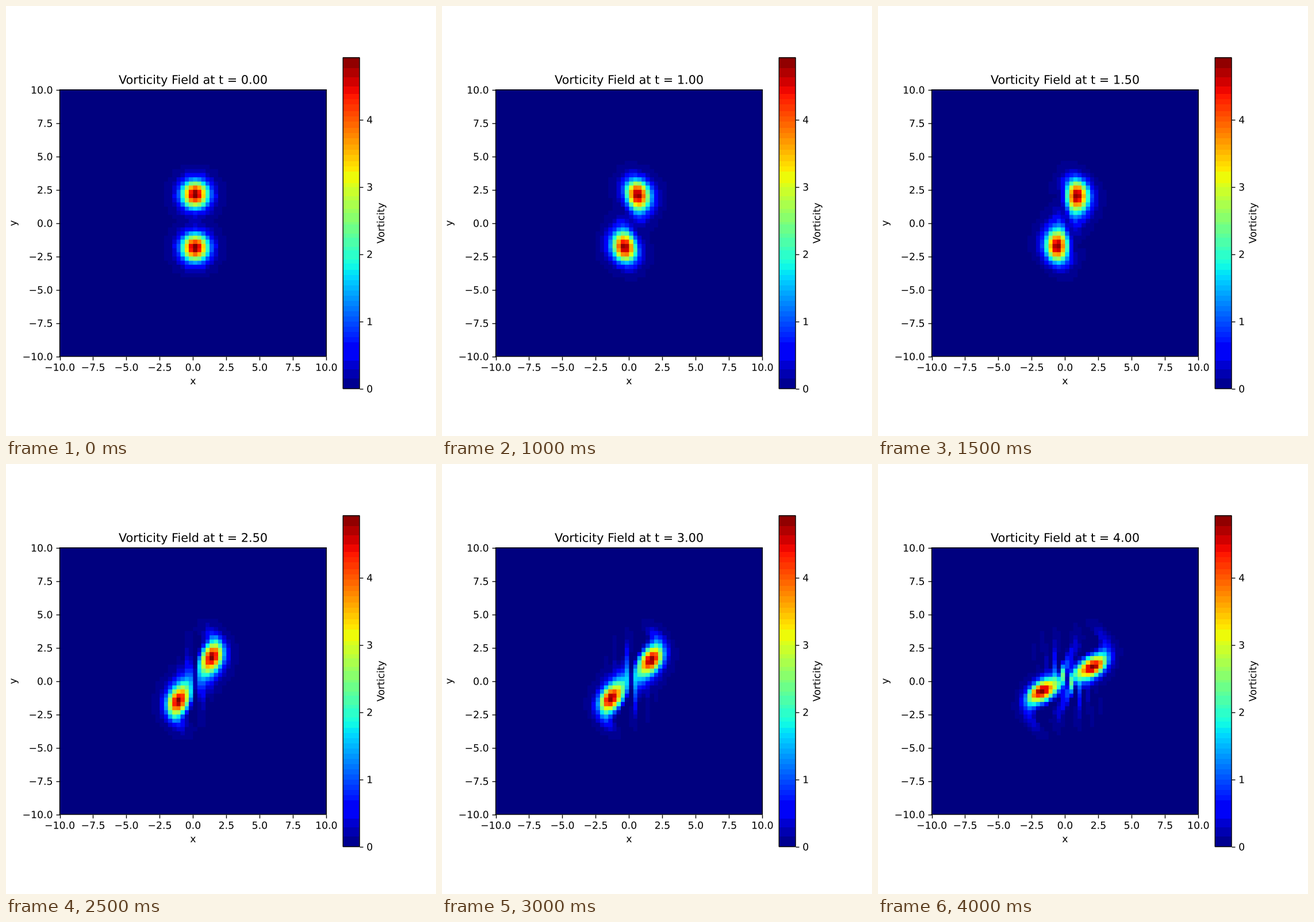
A matplotlib script that plays this animation: 748x748 px, repeating every 4.5 s.

```python
import numpy as np
import matplotlib.pyplot as plt
from matplotlib.animation import FuncAnimation
from matplotlib.cm import ScalarMappable
from matplotlib.colors import ListedColormap, Normalize
from matplotlib.patheffects import Normal

STAGE = 748
FINE = 1200      # layout grid on which the cell edges are whole numbers
N = 64
L = 20.0
H = L / N
NU = 0.001
DT = 0.0125
SAVE_EVERY = 0.5
FRAMES = 9

# Smooth sub-pixel placement of lines and text
plt.rcParams["path.snap"] = False
plt.rcParams["path.effects"] = [Normal()]
plt.rcParams["text.hinting"] = "none"

axis = np.linspace(-L / 2, L / 2, N, endpoint=False)
X, Y = np.meshgrid(axis, axis)
k = 2 * np.pi * np.fft.fftfreq(N, d=H)
K2 = k[None, :] ** 2 + k[:, None] ** 2
K2[0, 0] = 1.0


def stream(w):
    """Periodic solution of laplacian(psi) = w with zero mean."""
    wt = np.fft.fft2(w)
    wt[0, 0] = 0
    return np.real(np.fft.ifft2(-wt / K2))


def diff(f, ax):
    return (np.roll(f, -1, ax) - np.roll(f, 1, ax)) / (2 * H)


def laplacian(f):
    total = sum(np.roll(f, s, ax) for s in (-1, 1) for ax in (0, 1))
    return (total - 4 * f) / H**2


def rhs(w):
    psi = stream(w)
    advect = diff(psi, 1) * diff(w, 0) - diff(psi, 0) * diff(w, 1)
    return NU * laplacian(w) + advect


def rk4(w):
    a = rhs(w)
    b = rhs(w + DT / 2 * a)
    c = rhs(w + DT / 2 * b)
    d = rhs(w + DT * c)
    return w + DT / 6 * (a + 2 * b + 2 * c + d)


def simulate():
    w = sum(5 * np.exp(-X**2 - (Y - y0) ** 2) for y0 in (-2, 2))
    fields = [w]
    for _ in range(FRAMES - 1):
        for _ in range(round(SAVE_EVERY / DT)):
            w = rk4(w)
        fields.append(w)
    return fields


def banded_jet():
    """Jet in flat bands: 8 levels of red and blue, 16 of green."""
    lut = plt.get_cmap("jet")(np.arange(256), bytes=True)[:, :3].astype(int)
    keys = lut // np.array([32, 16, 32])
    out = np.empty((256, 3))
    for key in np.unique(keys, axis=0):
        same = (keys == key).all(axis=1)
        out[same] = lut[same].mean(axis=0) / 255
    return ListedColormap(out)


def coverage(start, size):
    """First pixel of the plot box and the share of each cell in each pixel."""
    edges = (start + np.round(np.arange(N + 1) * size / N)) * STAGE / FINE
    first = int(np.floor(edges[0]))
    p = np.arange(first, np.ceil(edges[-1]))[:, None]
    share = np.minimum(p + 1, edges[1:]) - np.maximum(p, edges[:-1])
    share = np.clip(share, 0, None)
    return first, share / share.sum(axis=1, keepdims=True)


fields = simulate()
scale = ScalarMappable(Normalize(0, fields[0].max()), banded_jet())
left, wx = coverage(150, 744)
bottom, wy = coverage(222, 744)


def paint(w):
    cells = scale.to_rgba(w)[..., :3]
    rgb = np.einsum("ij,jkc,lk->ilc", wy, cells, wx, optimize=True)
    return np.uint8(np.clip(np.round(rgb * 255), 0, 255))


fig, ax = plt.subplots(figsize=(6, 6), dpi=STAGE / 6)
im = fig.figimage(paint(fields[0]), xo=left, yo=bottom, origin="lower",
                  zorder=-1)
ax.patch.set_visible(False)
ax.set(xlim=(-10, 10), ylim=(-10, 10), aspect="equal", xlabel="x", ylabel="y")
fig.colorbar(scale, ax=ax, label="Vorticity")
title = ax.set_title("Vorticity Field at t = 0.00")


def update(i):
    im.set_data(paint(fields[i]))
    title.set_text(f"Vorticity Field at t = {i * SAVE_EVERY:.2f}")
    return im, title


anim = FuncAnimation(fig, update, frames=FRAMES, interval=500, repeat=True,
                     repeat_delay=0, blit=False)
plt.show()
```
